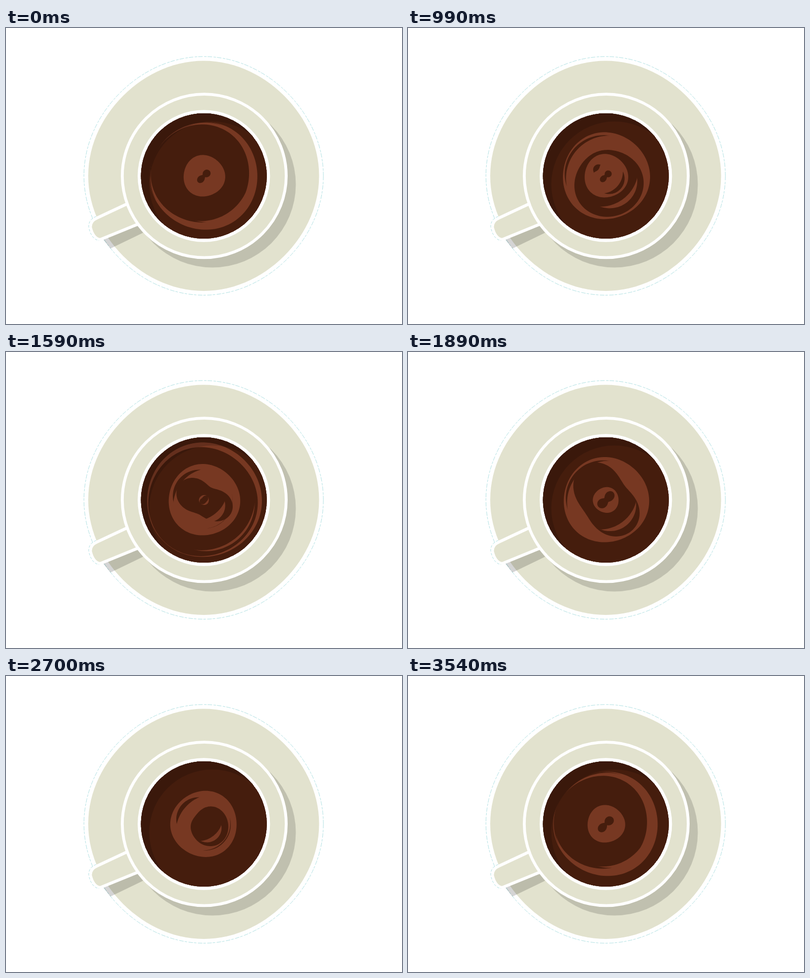
An HTML page that plays this animation: 800x600 px, repeating every 3570 ms.

```html
<!DOCTYPE html>
<html lang="en">
<head>
<meta charset="utf-8">
<title>Coffee</title>
<style>
html, body { margin: 0; width: 100%; height: 100%; overflow: hidden; background: #fff; }
svg { display: block; width: 800px; height: 600px; }
</style>
</head>
<body>
<svg viewBox="0 0 800 600">
  <defs>
    <clipPath id="brim"><circle cx="399.7" cy="300" r="127.5"/></clipPath>
  </defs>
  <path id="fringe" fill="#fff" stroke="#8fd3d6" stroke-width=".7" stroke-dasharray="9 3 5 2"/>
  <path id="saucer" fill="#e2e2ce"/>
  <circle cx="417" cy="317" r="168.5" fill-opacity=".15"/>
  <path d="M264 399L277 415L211 447L196 428Z" fill-opacity=".17"/>
  <path d="M250 354L184 385Q170 391 170.500 404Q176 427 190 429L268 397Z" fill="#e2e2ce" stroke="#fff" stroke-width="6"/>
  <path d="M182 382Q167 388 167 403Q172 428 188 431" fill="none" stroke="#8fd3d6" stroke-width=".7" stroke-dasharray="5 3"/>
  <circle cx="400.5" cy="299.800" r="165.6" fill="#e2e2ce" stroke="#fff" stroke-width="5.800"/>
  <circle cx="399.7" cy="300" r="133.700" fill="#fff"/>
  <g clip-path="url(#brim)">
    <circle cx="399.7" cy="300" r="127.5" fill="#451d0d" shape-rendering="crispEdges"/>
    <path id="milk" fill="#773822"/>
    <path id="slits" fill="#451d0d"/>
    <path d="M260 160H540V440H260ZM289.500 317a127.500 127.500 0 1 0 255 0a127.500 127.500 0 1 0 -255 0Z" fill-rule="evenodd" fill-opacity=".16"/>
  </g>
</svg>
<script>
const LOOP = 3570, TICK = 30, STEPS = 48, CX = 400, CY = 300, SAMPLES = 120;

// Each wave opens into a ring; its thick side leans to an angle and turns.
const waves = [
  { birth: 1, lean: 222, turn: 7, lobes: 1 },
  { birth: 13.5, lean: 300, turn: 7, lobes: 2 },
  { birth: 30, lean: 235, turn: 16, lobes: 1 }
];

const clamp = (v, lo = 0, hi = 1) => Math.max(lo, Math.min(hi, v));
const rad = deg => deg * Math.PI / 180;
const get = id => document.getElementById(id);

function loop(radius, cx = CX, cy = CY, direction = 1) {
  const points = Array.from({ length: SAMPLES }, (_, i) => {
    const a = direction * i / SAMPLES * 2 * Math.PI, r = Math.max(0, radius(a));
    return (cx + r * Math.cos(a)).toFixed(2) + " " + (cy + r * Math.sin(a)).toFixed(2);
  });
  return "M" + points.join("L") + "Z";
}

// A closed band whose thickness depends on the angle.
function band(outer, thickness) {
  return loop(outer) + loop(a => outer(a) - Math.max(0, thickness(a)), CX, CY, -1);
}

// A tapered arc around the angle "middle".
function blade(r, thick, middle, halfSpan) {
  const edge = Math.cos(rad(halfSpan));
  const taper = a => thick * Math.max(0, (Math.cos(a - rad(middle)) - edge) / (1 - edge));
  return band(a => r + taper(a) / 2, taper);
}

function drawWave({ birth, lean, turn, lobes }, step) {
  const age = (step - birth + STEPS + 12) % STEPS - 12;
  if (age < -9 || age > 22) return { milk: "", slits: "" };

  const young = age < 0;
  const size = Math.min(116, 46 + age * (young ? 4 : 3.5));
  const thick = young ? 0.83 * size * (1 + age / 12) : 38 * (1 - age / 22) ** 0.8;
  const bias = young ? 0.1 - age * 0.1 : Math.min(0.9, 0.1 + age * 0.06);
  const angle = rad(young ? 45 : lean + turn * (age - 8));
  const count = young ? 2 : lobes;

  const outer = a => size + Math.min(1.2, size / 40) * Math.sin(3 * a + birth);
  let milk = band(outer, a => thick * (1 + bias * Math.cos(count * (a - angle))));
  let slits = "";

  if (age > -1) slits += blade(size - 18 + age, 0.3 * thick, 220, 25 + 2.5 * age);
  if (age > -1 && age < 8) slits += blade(0.8 * size, 8 - age, 40, 55);
  if (age > 4) {
    const fadeIn = clamp((age - 4) / 3);
    milk += blade(0.93 * (size - thick), fadeIn * (3 + 0.35 * thick), 52, 48);
  }
  return { milk, slits };
}

const saucer = grow => loop(a => 231.5 + grow + 1.7 * Math.cos(4 * a), 399.3, 299.7);
get("saucer").setAttribute("d", saucer(0));
get("fringe").setAttribute("d", saucer(8.7));

let shown = -1;
function draw(ms) {
  const step = Math.floor(Math.floor(ms % LOOP / TICK) / 2.5);
  if (step === shown) return;
  shown = step;
  const parts = waves.map(wave => drawWave(wave, step));
  for (const id of ["milk", "slits"])
    get(id).setAttribute("d", parts.map(part => part[id]).join(""));
}

const begin = performance.now();
function tick() {
  draw(performance.now() - begin);
  requestAnimationFrame(tick);
}
tick();
</script>
</body>
</html>
```
